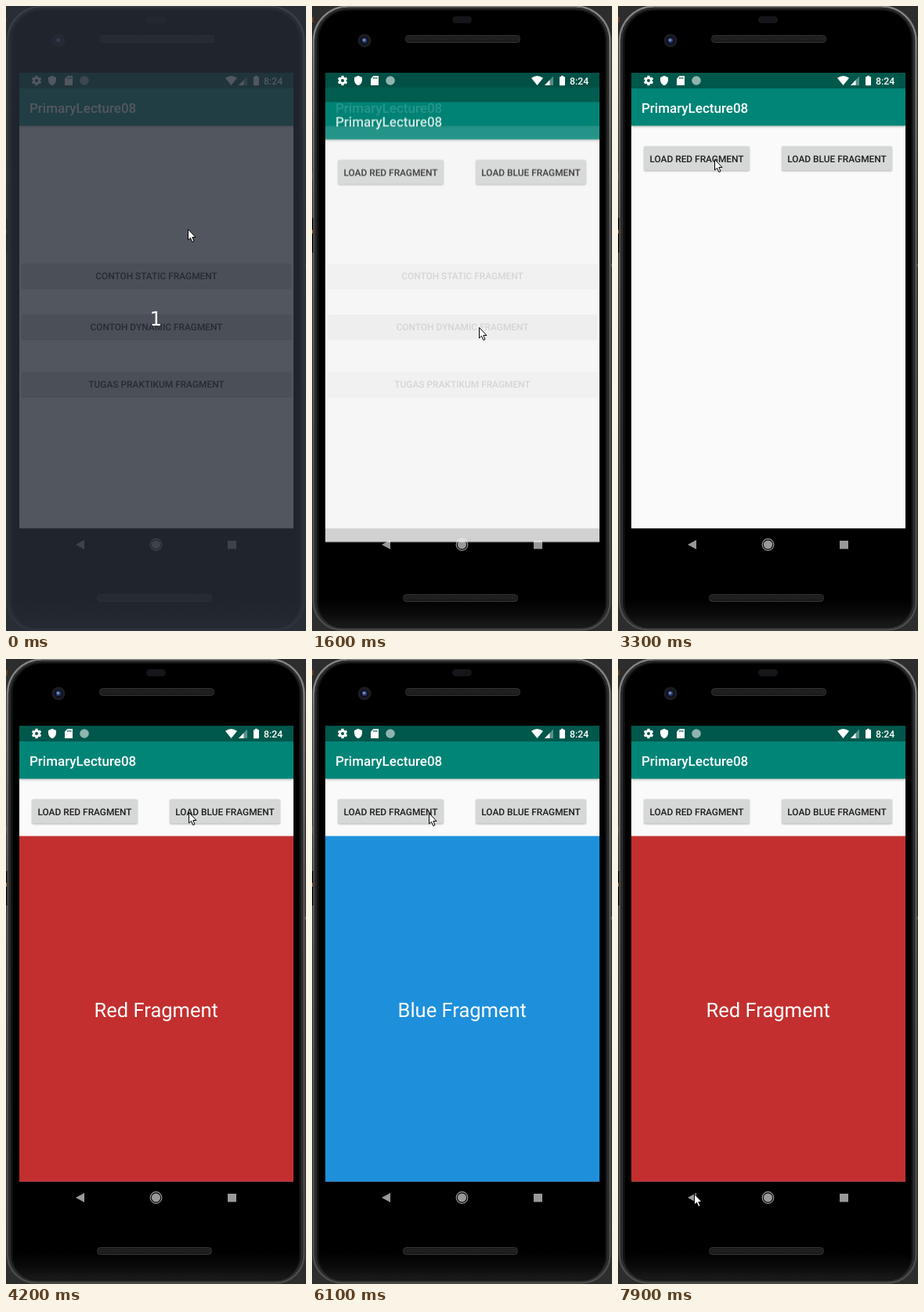
Recreate the animation shown at these times as an HTML page with a canvas. Size 383 by 796 pixels, loop 8000 ms.

```html
<!DOCTYPE html>
<html lang="id">
<head>
<meta charset="utf-8">
<title>Fragment demo</title>
<style>
html, body { margin: 0; width: 100%; height: 100%; overflow: hidden; background: #2b2b2b; }
canvas { display: block; }
</style>
</head>
<body>
<canvas id="stage" width="383" height="796"></canvas>
<script>
const W = 383, H = 796, LOOP = 8000, STEP = 100;
const FONT = 'Roboto, "Noto Sans", sans-serif';
const APP = 'PrimaryLecture08';
const SCREEN = { x: 17, y: 85, w: 350, h: 580.6 };

const ctx = document.getElementById('stage').getContext('2d');
const layer = document.createElement('canvas');
layer.width = W;
layer.height = H;
const lctx = layer.getContext('2d');
ctx.textRendering = lctx.textRendering = 'geometricPrecision';

const menu = [
  { x: 20, y: 328, w: 344, h: 31, label: 'CONTOH STATIC FRAGMENT' },
  { x: 20, y: 393, w: 344, h: 31, label: 'CONTOH DYNAMIC FRAGMENT' },
  { x: 20, y: 466, w: 344, h: 31, label: 'TUGAS PRAKTIKUM FRAGMENT' }
];
const redBtn = { x: 33, y: 178.6, w: 135, h: 31, label: 'LOAD RED FRAGMENT' };
const blueBtn = { x: 209, y: 178.6, w: 141, h: 31, label: 'LOAD BLUE FRAGMENT' };

// Pointer stops: time, x, y
const path = [
  [0, 232, 284], [100, 230, 297], [300, 220, 349], [600, 213, 409],
  [1700, 213, 409], [2200, 157, 238], [2400, 123, 196], [2600, 123, 196],
  [2700, 123, 195], [3700, 123, 195], [4200, 233, 195], [5200, 233, 195],
  [5500, 217, 196], [5600, 217, 196], [6100, 149, 196], [6600, 149, 196],
  [7500, 108, 634], [7900, 97, 681], [LOOP, 97, 681]
];

// Button presses: start, end, centre, growth per ms, strength
const presses = [
  { btn: menu[1], from: 1400, to: 1900, x: 213, y: 409, grow: 1.2, alpha: 0.1 },
  { btn: redBtn, from: 3400, to: 3800, x: 123, y: 195, grow: 0.1, alpha: 0.04 },
  { btn: blueBtn, from: 4900, to: 5400, x: 233, y: 195, grow: 0.1, alpha: 0.04 },
  { btn: redBtn, from: 6300, to: 6500, x: 149, y: 196, grow: 0.3, alpha: 0.04 }
];

const clamp = v => Math.max(0, Math.min(1, v));

function rect(c, x, y, w, h, fill) {
  c.fillStyle = fill;
  c.fillRect(x, y, w, h);
}

function round(c, x, y, w, h, r, fill, stroke, width = 1) {
  c.beginPath();
  c.roundRect(x, y, w, h, r);
  if (fill) { c.fillStyle = fill; c.fill(); }
  if (stroke) { c.strokeStyle = stroke; c.lineWidth = width; c.stroke(); }
}

function disc(c, x, y, r, fill) {
  c.beginPath();
  c.arc(x, y, r, 0, Math.PI * 2);
  c.fillStyle = fill;
  c.fill();
}

function poly(c, pts, fill) {
  c.beginPath();
  pts.forEach(([x, y]) => c.lineTo(x, y));
  c.closePath();
  c.fillStyle = fill;
  c.fill();
}

function text(c, str, x, y, size, weight, fill, align = 'center', family = FONT) {
  c.font = `${weight} ${size}px ${family}`;
  c.textAlign = align;
  c.fillStyle = fill;
  c.fillText(str, x, y);
}

function shadow(c, dy, blur, alpha, draw) {
  c.save();
  c.shadowColor = `rgba(0,0,0,${alpha})`;
  c.shadowOffsetY = dy;
  c.shadowBlur = blur;
  draw();
  c.restore();
}

function gradient(x0, y0, x1, y1, ...colors) {
  const g = ctx.createLinearGradient(x0, y0, x1, y1);
  colors.forEach((col, i) => g.addColorStop(i / (colors.length - 1), col));
  return g;
}

function speaker(x, y, w, h) {
  round(ctx, x + 0.5, y + 0.5, w - 1, h - 1, 4, '#1c1c1c', '#333');
  for (let i = 0; i < w - 8; i += 3) {
    rect(ctx, x + 4 + i, y + 3, 1, 1, '#333');
    rect(ctx, x + 5 + i, y + 5, 1, 1, '#303030');
  }
}

function drawPhone() {
  rect(ctx, 0, 0, W, H, '#2d2d2d');
  rect(ctx, 0, 14, 2, 7, '#6b4020');
  rect(ctx, 0, 212, 4, 10, '#4a4a4a');
  rect(ctx, 381, 328, 2, 4, '#555');
  // bezel: a bright rim that falls off to black
  const rim = gradient(0, 0, 0, H, '#858585', '#5c5c5c', '#505050', '#4c4c4c');
  round(ctx, 2, 0.5, 378.5, 794, [44, 44, 36, 36], '#181818', rim, 2.5);
  round(ctx, 5, 3, 372.5, 789, [41, 41, 33, 33], '#0c0c0c', '#2c2c2c', 2.5);
  round(ctx, 8, 5, 367, 786, [38, 38, 31, 31],
    gradient(0, 755, 0, 792, '#000', '#0a0a0a', '#1c1c1c'), '#141414', 1.5);
  rect(ctx, 0, 270, 1.5, 44, '#050505');
  rect(ctx, 0, 285, 1, 5, '#b5651d');
  round(ctx, 179, 13, 25, 9, 4.5, '#15151a');
  speaker(119, 37, 147, 10);
  speaker(116, 749, 147, 10);
  disc(ctx, 67, 44, 8.5, '#1d1d20');
  disc(ctx, 67, 44, 5.5, '#0d1222');
  disc(ctx, 67, 43.8, 3.2, '#2a3c6c');
  disc(ctx, 66.5, 43.3, 1.6, '#8494c0');
}

function drawStatus() {
  const white = '#fff';
  // gear
  ctx.save();
  ctx.translate(39, 95);
  for (let i = 0; i < 6; i++) {
    ctx.rotate(Math.PI / 3);
    rect(ctx, -1.6, -6.2, 3.2, 3, white);
  }
  ctx.beginPath();
  ctx.arc(0, 0, 3.4, 0, Math.PI * 2);
  ctx.strokeStyle = white;
  ctx.lineWidth = 2.8;
  ctx.stroke();
  ctx.restore();
  // shield
  ctx.beginPath();
  ctx.moveTo(59, 88.8);
  ctx.lineTo(64, 91);
  ctx.lineTo(64, 94.5);
  ctx.quadraticCurveTo(63.5, 99.5, 59, 101.3);
  ctx.quadraticCurveTo(54.5, 99.5, 54, 94.5);
  ctx.lineTo(54, 91);
  ctx.fillStyle = white;
  ctx.fill();
  // memory card
  poly(ctx, [[78.5, 89], [85, 89], [85, 101], [75, 101], [75, 92.5]], white);
  [78.3, 80.3, 82.3].forEach(x => rect(ctx, x, 90.5, 1, 2.5, '#00574b'));
  disc(ctx, 100, 95, 5.8, '#8fb5ae');
  // wifi
  ctx.beginPath();
  ctx.moveTo(287.5, 101);
  ctx.lineTo(280, 91.7);
  ctx.quadraticCurveTo(287.5, 86.3, 295, 91.7);
  ctx.fillStyle = white;
  ctx.fill();
  // signal
  poly(ctx, [[308, 89.5], [308, 101], [297, 101]], 'rgba(255,255,255,.35)');
  poly(ctx, [[303.5, 94.2], [303.5, 101], [297, 101]], white);
  // battery
  rect(ctx, 318, 88.8, 3, 2, white);
  round(ctx, 316, 90, 7, 11.2, 0.8, white);
  text(ctx, '8:24', 329, 99.7, 12.3, 500, white, 'left');
}

function drawNav() {
  const tint = 'rgba(255,255,255,.6)';
  poly(ctx, [[89, 686], [100, 680], [100, 692]], tint);
  disc(ctx, 191.5, 686, 5.6, tint);
  ctx.beginPath();
  ctx.arc(191.5, 686, 7.3, 0, Math.PI * 2);
  ctx.strokeStyle = tint;
  ctx.lineWidth = 1.2;
  ctx.stroke();
  rect(ctx, 283, 681, 11, 10.5, tint);
}

function drawButton(c, b, t) {
  shadow(c, 1, 2, 0.28, () => round(c, b.x, b.y, b.w, b.h, 2, '#d6d7d7'));
  const p = presses.find(p => p.btn === b && t >= p.from && t < p.to);
  if (p) {
    c.save();
    c.beginPath();
    c.roundRect(b.x, b.y, b.w, b.h, 2);
    c.clip();
    disc(c, p.x, p.y, 35 + (t - p.from) * p.grow, `rgba(0,0,0,${p.alpha})`);
    c.restore();
  }
  text(c, b.label, b.x + b.w / 2, Math.round(b.y) + 20, 11.9, 500, 'rgba(0,0,0,.87)');
}

function drawWindow(c, buttons, t, panel) {
  const { x, y, w, h } = SCREEN;
  c.save();
  c.beginPath();
  c.rect(x, y, w, h);
  c.clip();
  rect(c, x, y, w, h, '#fafafa');
  shadow(c, 1.5, 3.5, 0.32, () => rect(c, x, 105, w, 47.5, '#008577'));
  rect(c, x, y, w, 20, '#00574b');
  text(c, APP, 30, 136, 17, 500, '#fff', 'left');
  buttons.forEach(b => drawButton(c, b, t));
  if (panel) {
    rect(c, x, 225.5, w, 441, panel.color);
    text(c, panel.label, 191.7, 456, 25.5, 400, '#fff');
  }
  c.restore();
}

function panelAt(t) {
  const red = { color: '#c32f2f', label: 'Red Fragment' };
  const blue = { color: '#1e90db', label: 'Blue Fragment' };
  if (t < 3400) return null;
  return t >= 5000 && t < 6400 ? blue : red;
}

function drawApp(t) {
  const age = t - 1527;
  const slide = 56 * (1 - clamp(age / 350)) ** 5;
  const fade = 1 - (1 - clamp(age / 200)) ** 4;
  if (fade < 1) {
    drawWindow(ctx, menu, t);
    if (age > 0) rect(ctx, SCREEN.x, SCREEN.y, SCREEN.w, SCREEN.h, 'rgba(0,0,0,.08)');
  }
  if (age > 0) {
    lctx.clearRect(0, 0, W, H);
    drawWindow(lctx, [redBtn, blueBtn], t, panelAt(t));
    ctx.save();
    ctx.beginPath();
    ctx.rect(SCREEN.x, SCREEN.y, SCREEN.w, 621);
    ctx.clip();
    ctx.globalAlpha = fade;
    ctx.drawImage(layer, 0, slide);
    ctx.restore();
  }
}

function pointerAt(t) {
  const i = path.findIndex(p => p[0] > t);
  const a = path[i - 1], b = path[i];
  const k = (t - a[0]) / (b[0] - a[0]);
  return [1, 2].map(n => Math.round(a[n] + (b[n] - a[n]) * k));
}

function drawPointer(t) {
  const [x, y] = pointerAt(t);
  ctx.save();
  ctx.translate(x + 0.5, y + 0.5);
  poly(ctx, [[0, 0], [0, 13.5], [3, 10.8], [5.3, 16], [7.5, 15], [5.3, 10], [9.5, 10]], '#fff');
  ctx.strokeStyle = '#000';
  ctx.lineWidth = 1;
  ctx.stroke();
  ctx.restore();
}

function drawCountdown() {
  rect(ctx, 0, 0, W, H, 'rgba(41,45,55,.8)');
  text(ctx, '1', 191.5, 407, 25, 400, '#fff', 'center', '"DejaVu Sans", sans-serif');
}

function render(now) {
  const t = Math.floor((now % LOOP) / STEP) * STEP;
  drawPhone();
  rect(ctx, SCREEN.x, 665, SCREEN.w, 41, '#000');
  drawApp(t);
  drawStatus();
  drawNav();
  if (t < 100) drawCountdown();
  drawPointer(t);
}

const start = performance.now();
function tick() {
  render(performance.now() - start);
  requestAnimationFrame(tick);
}
tick();
</script>
</body>
</html>
```
